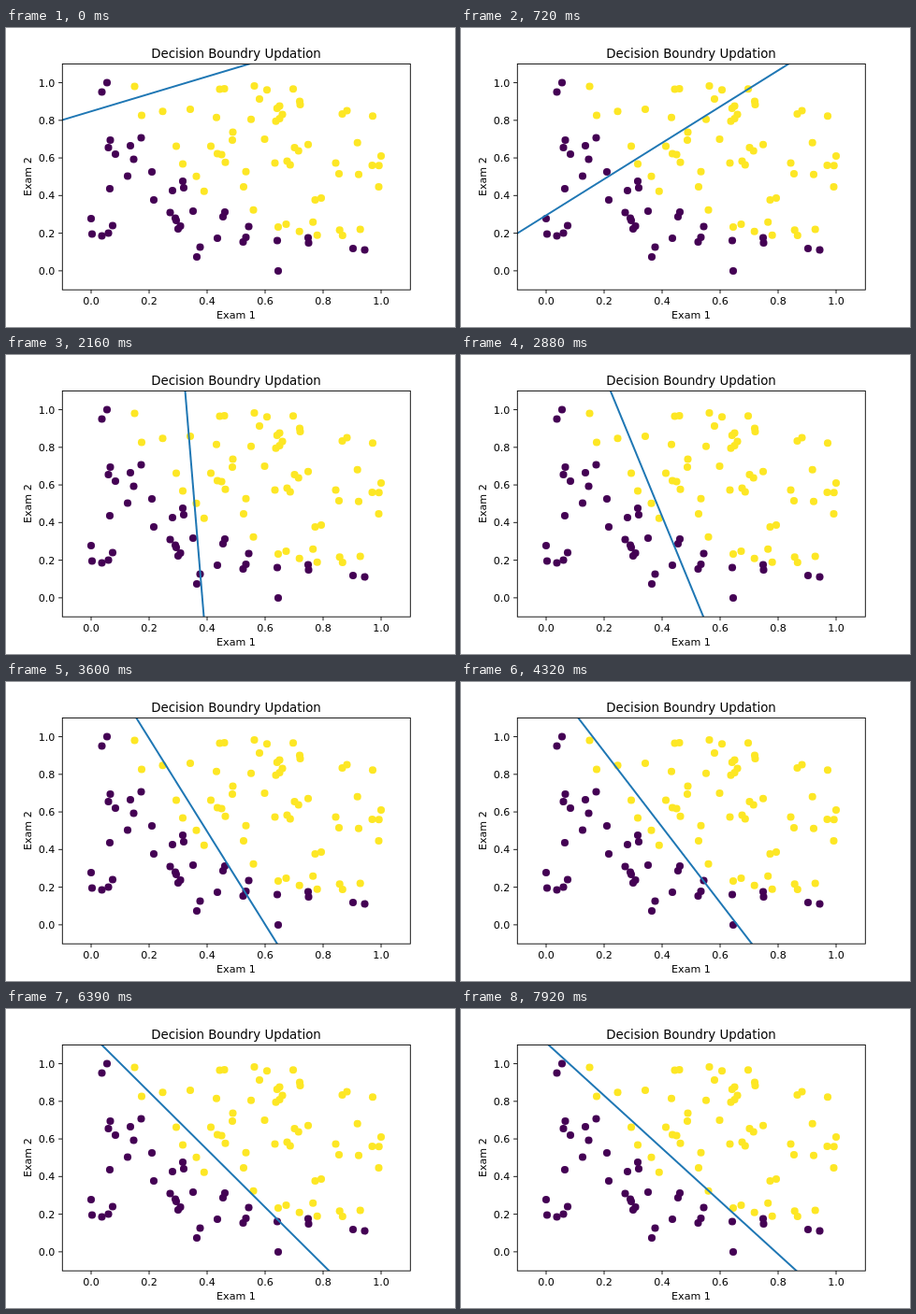
Recreate the animation shown at these times as an HTML page. Size 480 px wide and 320 px high, loop 8000 ms.

```html
<!DOCTYPE html>
<html lang="en">
<head>
<meta charset="utf-8">
<title>Decision Boundry Updation</title>
<style>
html, body { margin: 0; width: 100%; height: 100%; overflow: hidden; background: #fff; }
svg { display: block; width: 480px; height: 320px; }
text { font: 11.11px "DejaVu Sans", sans-serif; fill: #000; text-anchor: middle; }
.title { font-size: 13.33px; }
.end { text-anchor: end; }
.axis { fill: none; stroke: #000; stroke-width: .89; }
</style>
</head>
<body>
<svg id="plot" viewBox="0 0 480 320">
  <defs><clipPath id="area"><rect x="60" y="38.4" width="372" height="241.6"/></clipPath></defs>
  <rect width="480" height="320" fill="#fff"/>
  <g id="dots"></g>
  <line id="boundary" clip-path="url(#area)" stroke="#1f77b4" stroke-width="2"/>
  <rect class="axis" x="60.3" y="38.5" width="372" height="241.7"/>
  <g id="ticks"></g>
  <text class="title" x="246" y="31.8">Decision Boundry Updation</text>
  <text x="246" y="310.5">Exam 1</text>
  <text transform="translate(27.3 159.2) rotate(-90)">Exam 2</text>
</svg>
<script>
const STEP = 90, LOOP = 8000, LAST = 88;
const $ = id => document.getElementById(id);
const px = x => 91 + 310 * x;
const py = y => 259.87 - 201.33 * y;

function add(parent, tag, attrs, text) {
  const el = document.createElementNS("http://www.w3.org/2000/svg", tag);
  for (const name in attrs) el.setAttribute(name, attrs[name]);
  if (text) el.textContent = text;
  parent.appendChild(el);
}

const failed = [
  [108,58.5],[102.5,68.5],[111.5,120],[109.5,128],[117,135],[133,126],[136.5,140.5],[144.5,117.5],
  [130,158.5],[111,172],[156,154],[158,184],[178,174],[189,164],[190,171],[91,204],
  [92,220.5],[102.5,222.5],[109.5,219.5],[114,211.5],[175.5,197.5],[181,203.5],[182,206],[186.5,212],
  [184,215],[200,196],[232,202],[234,197],[207.5,234.5],[204,245],[226,225],[253.5,229],
  [256.5,224],[259.5,212.5],[290,227.5],[291,260],[323,224.5],[323.5,230],[371,236],[383.5,237.5]
];
const passed = [
  [137.5,62.5],[145,93.5],[167.5,89.3],[197,87],[228.5,65.5],[233.5,65],[265.5,62],[279,66.3],
  [271,76],[307,65.2],[314,78.5],[314.5,82],[292.5,83.5],[289.8,86],[295.5,92.5],[292.5,97],
  [288.5,99.8],[262,97.8],[225,95.7],[359.5,92],[364.5,88.5],[392,94.3],[242.5,111.5],[242,120],
  [276.5,119],[219,126.5],[182,126.5],[226,134.5],[230.5,135.5],[234.5,143.7],[189,145.5],[203.5,158.7],
  [211.8,174.7],[308.5,128],[312.7,131.5],[323,124.7],[375.7,122.7],[401,137],[287.5,144.5],[300.5,142.5],
  [303.8,146.5],[352.5,144.5],[391.5,147],[398.7,147.3],[356,156],[377,156.7],[398.5,170],[256.5,153.7],
  [254,170],[264.5,194.7],[330.5,184],[337,182],[291,213],[299.5,210],[313.7,217.8],[328.2,207.7],
  [332.7,221.8],[356.7,216.3],[359.8,222],[378.7,215.5]
];

function drawDots(points, fill) {
  for (const [cx, cy] of points) add($("dots"), "circle", { cx, cy, r: 4.05, fill });
}
drawDots(failed, "#440154");
drawDots(passed, "#fde725");

for (let i = 0; i <= 5; i++) {
  const v = i / 5, x = px(v), y = py(v), label = v.toFixed(1), g = $("ticks");
  add(g, "path", { class: "axis", d: `M${x} 280v4.2M60 ${y}h-3.9` });
  add(g, "text", { x, y: 296.3 }, label);
  add(g, "text", { x: 52.3, y: y + 4.1, class: "end" }, label);
}

// Growth of the first weight over the training epochs
const growth = [[0, .225], [16, .7077], [24, .9558], [40, 1.438], [56, 1.876], [71, 2.237], [88, 2.577]];

function slope(i) {
  const a = growth[Math.max(i - 1, 0)], b = growth[Math.min(i + 1, growth.length - 1)];
  return (b[1] - a[1]) / (b[0] - a[0]);
}

function weightAt(k) {
  let i = 0;
  while (i < growth.length - 2 && k > growth[i + 1][0]) i++;
  const [k0, g0] = growth[i], [k1, g1] = growth[i + 1];
  const h = k1 - k0, s = (k - k0) / h, r = 1 - s;
  return r * r * (1 + 2 * s) * g0 + s * s * (3 - 2 * s) * g1
    + h * s * r * (r * slope(i) - s * slope(i + 1));
}

// Slow rotation about a pivot plus a quickly fading shift
function weights(k) {
  const g = weightAt(k), e = .1745 * Math.pow(.622, k);
  return [.62 - 1.032 * g + e, g + .47 * e, 1.1 * g - 1 + .51 * e];
}

function render(t) {
  const k = Math.min(Math.floor(t / STEP), LAST);
  const [w0, w1, w2] = weights(k);
  const xAt = y => px(-(w0 + w2 * y) / w1);
  const line = $("boundary");
  line.setAttribute("x1", xAt(-.2));
  line.setAttribute("y1", py(-.2));
  line.setAttribute("x2", xAt(1.2));
  line.setAttribute("y2", py(1.2));
}

const start = performance.now();
function tick() {
  render((performance.now() - start) % LOOP);
  requestAnimationFrame(tick);
}
tick();
</script>
</body>
</html>
```
